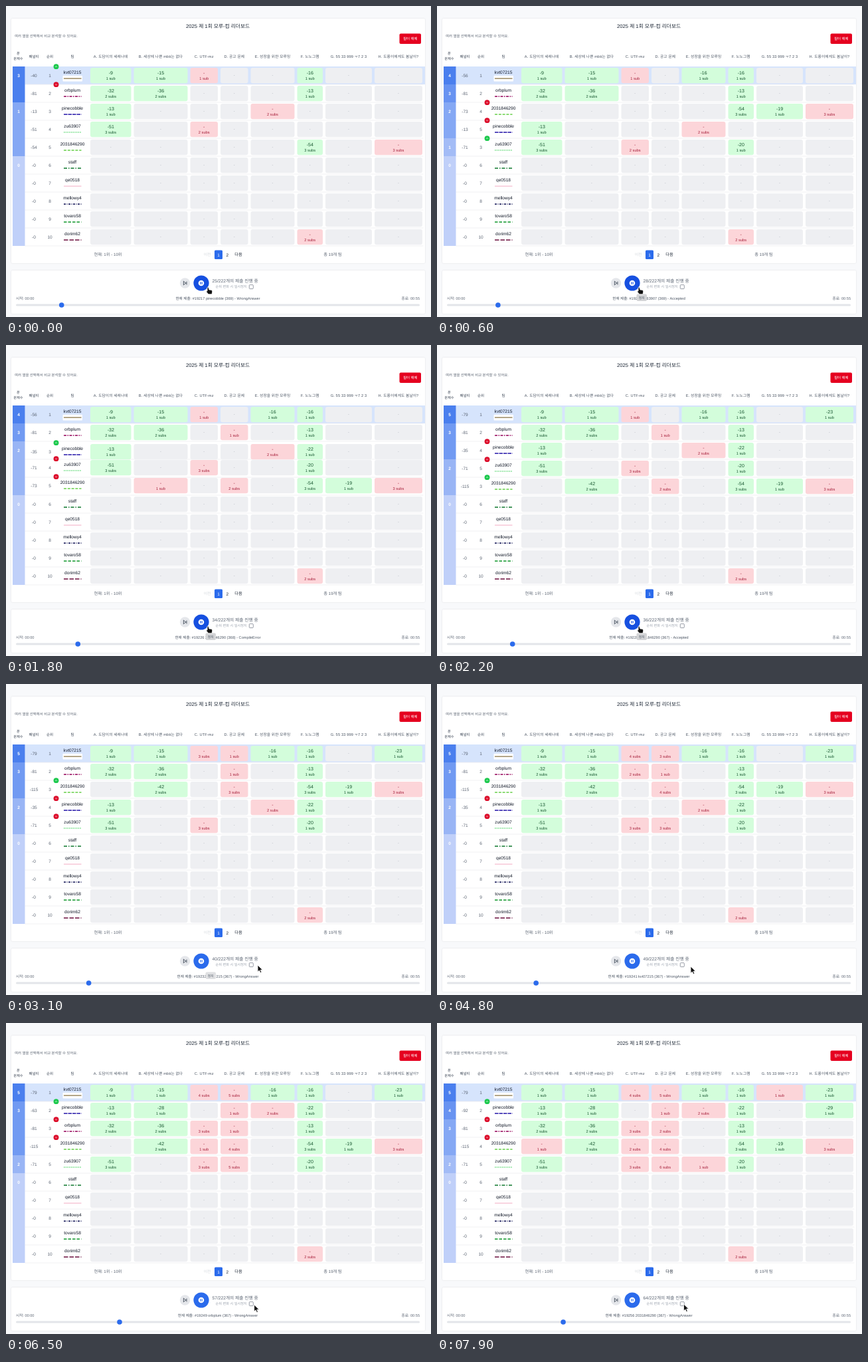
Animation of 640 by 468 pixels, one loop 8000 ms. Source, as an HTML page:

```html
<!DOCTYPE html>
<html lang="ko">
<head>
<meta charset="utf-8">
<title>리더보드</title>
<style>
  html, body { margin: 0; width: 100%; height: 100%; overflow: hidden; background: #f8f9fb; }
  svg { display: block; width: 100vw; height: 100vh; }
  text { font-family: "Liberation Sans", "Noto Sans CJK KR", "Noto Sans CJK", sans-serif; text-rendering: geometricPrecision; }
  .card { fill: #fff; filter: drop-shadow(0 .6px 1.2px rgba(0, 0, 0, .1)); }
</style>
</head>
<body>
<svg viewBox="0 0 640 468">
  <g id="base"></g>
  <g id="groups"></g>
  <g id="rows"></g>
  <g id="badges"></g>
  <g id="player"></g>
  <g id="tooltip"></g>
  <g id="pointer"></g>
</svg>
<script>
const LOOP = 8000, STEP = 200, MOVE = 300, FIRST = 25, TOTAL = 222;
const TOP = 91, ROW = 27;
const GRAY = '#5b6472', BLUE = '#2b6bec';

// name, line colour, dash pattern, line width
const teams = [
  ['kvt07215', '#9b8a62', '', 1.5],
  ['orbplum', '#a3246f', '4 1.5 1.5 1.5', 1.6],
  ['pinecobble', '#4235b4', '5.5 1', 1.6],
  ['zu63907', '#6fdc82', '1.5 1.2', 1.5],
  ['2031846290', '#7dd663', '4 1.8', 1.6],
  ['staff', '#2f8a4a', '5 2 1.5 2', 1.6],
  ['qe0518', '#f5b9cd', '', 1.2],
  ['mellowy4', '#2b2d68', '3 1.5 1 1.5', 1.6],
  ['tovaro58', '#31a548', '4.5 2', 1.6],
  ['dorim62', '#803058', '6.5 2', 1.6]
];

// title, left edge, right edge
const problems = [
  ['A. 도담이의 세레나데', 127, 188.5],
  ['B. 세상에 나쁜 mbti는 없다', 192.5, 273.5],
  ['C. UTF-mz', 277.5, 319],
  ['D. 공고 문제', 323, 364.5],
  ['E. 성장을 위한 모루밍', 368.5, 434.5],
  ['F. 노노그램', 438.5, 477],
  ['G. 55 33 999 ㅜ7 2 3', 481, 551],
  ['H. 도롱이에게도 봄날이?', 555, 627]
];

// team, problem, penalty when solved; "!" is a compile error
const submissions = `
  1A 1A32 1B 1B36 1F13 2A13 3A 3A 3A51 4F 4F 4F54 0A9 0B15 0F16
  0C 3C 3C 4H 4H 4H 9F 9F 2E 2E
  0E16 4G19 3F20 3C 4D 1D 4D 2F22 4B!
  0H23 4B42 0C 4D 0C 0D 3D 1C 0D 3D 4D 1C 0C 3D 0D
  0D 2B28 4C 3D 2D 0D 3D 1C 2H29 4A 3E 0G 3D 1D 4C
`.trim().split(/\s+/).map(code => {
  const [, team, letter, score, error] = code.match(/(\d)([A-H])(\d*)(!?)/);
  const verdict = error ? 'CompileError' : score ? 'Accepted' : 'WrongAnswer';
  return { team: +team, problem: letter.charCodeAt(0) - 65, score: +score, verdict };
});

const states = buildStates();

function buildStates() {
  const board = teams.map(() => problems.map(() => ({ subs: 0, score: 0 })));
  const snapshot = () => {
    const rows = board.map(cells => {
      const solved = cells.filter(c => c.score);
      return {
        cells: cells.map(c => ({ ...c })),
        solved: solved.length,
        penalty: solved.reduce((sum, c) => sum + c.score, 0)
      };
    });
    const order = teams.map((_, i) => i)
      .sort((a, b) => rows[b].solved - rows[a].solved || rows[a].penalty - rows[b].penalty || a - b);
    return { rows, order, rank: teams.map((_, i) => order.indexOf(i)) };
  };
  const list = [snapshot()];
  for (const { team, problem, score } of submissions) {
    const cell = board[team][problem];
    cell.subs++;
    cell.score = score || cell.score;
    list.push(snapshot());
  }
  return list;
}

const el = id => document.getElementById(id);
const rect = (x, y, w, h, fill, r = 0, extra = '') =>
  `<rect x="${x}" y="${y}" width="${w}" height="${h}" rx="${r}" fill="${fill}" ${extra}/>`;
const circle = (x, y, r, fill) => `<circle cx="${x}" cy="${y}" r="${r}" fill="${fill}"/>`;
const path = (d, extra) => `<path d="${d}" ${extra}/>`;
// y is the vertical middle of the line
const text = (x, y, s, size, fill = GRAY, anchor = 'middle', extra = '') =>
  `<text x="${x}" y="${y + size * .36}" font-size="${size}" fill="${fill}" text-anchor="${anchor}" ${extra}>${s}</text>`;

function drawBase() {
  const bold = 'font-weight="500"';
  let s = rect(8, 19, 623, 368, '#fff', 2, 'class="card"') + rect(8, 398, 623, 65, '#fff', 2, 'class="card"');
  s += text(319, 30, '2025 제 1회 모루-컵 리더보드', 7.7, '#1f2937', 'middle', bold);
  s += text(13, 45, '여러 열을 선택해서 비교 분석할 수 있어요.', 5.4, GRAY, 'start');
  s += rect(592.5, 41.5, 32.5, 15.5, '#e5001f', 2) + text(608.8, 49.3, '필터 해제', 5.5, '#fff');
  s += text(18.5, 71.5, '푼', 5.2, '#374151', 'middle', bold) + text(18.5, 79.5, '문제수', 5.2, '#374151', 'middle', bold);
  s += text(42, 76, '패널티', 5.5, '#374151') + text(66, 76, '순위', 5.5, '#374151') + text(100, 76, '팀', 5.5, '#374151');
  for (const [title, left, right] of problems)
    s += text((left + right) / 2, 76, title, 5.7, '#4b5563', 'middle', 'letter-spacing=".12"');
  s += rect(28.5, TOP, 602.5, ROW, '#d6e4fc');
  for (let i = 1; i <= teams.length; i++) s += rect(28.5, TOP + i * ROW - .3, 600, .6, '#e6e8ec');
  s += text(153.5, 374, '현재: 1위 - 10위', 6.2) + text(492, 374, '총 19개 팀', 6.2);
  s += text(303, 374, '이전', 5.8, '#d1d5db') + rect(314, 367.5, 12, 13.5, BLUE, 1.5);
  s += text(320, 374.2, '1', 6.4, '#fff') + text(333.3, 374.2, '2', 6.4, '#1f2937') + text(350, 374, '다음', 6.2, '#1f2937');
  s += text(15, 439.5, '시작: 00:00', 5.6, GRAY, 'start') + text(623, 439.5, '종료: 00:55', 5.6, GRAY, 'end');
  s += circle(269.5, 417, 7.7, '#e5e7eb');
  s += path('M267.4 413.8V420.2M267.4 414.6L271.4 417L267.4 419.4M272 414.5V419.5', 'fill="none" stroke="#4b5563" stroke-width=".9"');
  s += text(315.5, 422.5, '순위 변화 시 일시정지', 5.2, '#9ca3af', 'start');
  s += rect(366.3, 419.6, 6, 6, '#fff', 1, 'stroke="#6b7280" stroke-width=".7"');
  s += rect(15, 448.5, 608, 3, '#e3e5e9', 1.5);
  el('base').innerHTML = s;
}

// Shapes below are drawn around the row's centre line.
function cellMarkup({ subs, score }, left, right) {
  const x = (left + right) / 2;
  const [fill, ink] = score ? ['#d3fddb', '#14532d'] : subs ? ['#fcd5d9', '#a51d38'] : ['#eeeff2', '#a3a9b4'];
  const box = rect(left, -11.6, right - left, 23.4, fill, 3);
  if (!subs) return box + text(x, 0, '-', 5.5, ink);
  return box + text(x, -4, score ? '-' + score : '-', 7, ink)
    + text(x, 4.6, subs + (subs > 1 ? ' subs' : ' sub'), 5.7, ink);
}

function rowMarkup(state, i) {
  const [name, color, dash, width] = teams[i], row = state.rows[i];
  return `<g>${text(42, 0, '-' + row.penalty, 6.5)}${text(66, 0, state.rank[i] + 1, 6.5)}`
    + text(100, -4.7, name, 6.6, '#111827')
    + rect(85.5, .3, 29.5, 8.8, '#fff', 1)
    + path('M87 4.6H113.5', `stroke="${color}" stroke-width="${width}" stroke-dasharray="${dash}"`)
    + row.cells.map((c, p) => cellMarkup(c, problems[p][1], problems[p][2])).join('') + '</g>';
}

function groupsMarkup({ rows, order }) {
  const counts = [...new Set(order.map(i => rows[i].solved))];
  const mix = (a, b, f) => Math.round(a + (b - a) * f);
  return counts.map((count, n) => {
    const f = n / (counts.length - 1);
    const members = order.filter(i => rows[i].solved === count);
    const y = TOP + ROW * order.indexOf(members[0]);
    const fill = `rgb(${mix(74, 192, f)},${mix(127, 208, f)},${mix(238, 249, f)})`;
    return rect(10, y, 18.5, ROW * members.length, fill)
      + text(19, y + 13.5, count, 6.5, '#fff', 'middle', 'font-weight="700"');
  }).join('');
}

function lastShuffle(k) {
  while (k > 1 && states[k].order.join() === states[k - 1].order.join()) k--;
  return k;
}

const easeOut = p => 1 - (1 - Math.min(1, p)) ** 3;

function rowTop(team, k, t) {
  let since = k;
  while (since > FIRST && states[since].rank[team] === states[since - 1].rank[team]) since--;
  const to = states[since].rank[team];
  const from = since > FIRST ? states[since - 1].rank[team] : to;
  const p = easeOut((t - (since - FIRST) * STEP) / MOVE);
  return TOP + ROW * (from + (to - from) * p);
}

function badgesMarkup(k, tops) {
  const at = lastShuffle(k);
  return teams.map((_, i) => {
    const change = states[at].rank[i] - states[at - 1].rank[i];
    if (!change) return '';
    const d = change < 0 ? 1 : -1, y = tops[i] + .2;
    return circle(75.5, y, 3.9, d > 0 ? '#1cc94d' : '#dc0b2a')
      + path(`M74 ${y + .7 * d}L75.5 ${y - .7 * d}L77 ${y + .7 * d}`, 'fill="none" stroke="#fff" stroke-width=".7"');
  }).join('');
}

function playerMarkup(k, hover) {
  const sub = submissions[k - 1], x = 15.5 + k * 2.728;
  const memory = k < 30 ? 369 : k < 35 ? 368 : 367;
  const blue = hover ? '#1650e0' : BLUE;
  return circle(294, 417, 11.6, blue) + circle(294, 417, 4.3, '#fff')
    + rect(292.3, 415.2, 1.1, 3.6, blue) + rect(294.6, 415.2, 1.1, 3.6, blue)
    + text(310.5, 414, `${k}/${TOTAL}개의 제출 진행 중`, 6.7, GRAY, 'start')
    + text(319, 439.5, `현재 제출: #${19192 + k} ${teams[sub.team][0]} (${memory}) - ${sub.verdict}`, 5.6, '#4b5563')
    + circle(x, 450, 3.8, BLUE);
}

// time, x, y of the pointer's tip
const track = [[0, 304, 423], [2750, 304, 423], [3050, 379, 423], [4800, 382, 425], [5400, 375, 424.5], [8000, 371.5, 423]];

function pointerAt(t) {
  const n = track.findIndex(key => key[0] > t);
  const [t0, x0, y0] = track[n - 1], [t1, x1, y1] = track[n];
  const p = (t - t0) / (t1 - t0), f = p * p * (3 - 2 * p);
  return [x0 + (x1 - x0) * f, y0 + (y1 - y0) * f];
}

const arrow = path('M0 0V10.2L2.4 8L4 11.6L5.8 10.8L4.2 7.3H7.4Z', 'fill="#111" stroke="#fff" stroke-width=".8"');
const hand = path('M-.9 .4Q0 -.6 .9 .4L2 4L5 4.3Q7 4.8 6.8 7L6 10.8H.8L-2.4 7Q-2.6 5.6 -1 6Z', 'fill="#111" stroke="#fff" stroke-width=".8"');

let shown = 0;

function render(t) {
  const k = FIRST + Math.floor(t / STEP), state = states[k];
  const hover = t < 2800;
  if (k !== shown) {
    el('groups').innerHTML = groupsMarkup(state);
    el('rows').innerHTML = teams.map((_, i) => rowMarkup(state, i)).join('');
    shown = k;
  }
  const tops = teams.map((_, i) => rowTop(i, k, t));
  tops.forEach((y, i) => el('rows').children[i].setAttribute('transform', `translate(0 ${y + ROW / 2})`));
  el('badges').innerHTML = badgesMarkup(k, tops);
  el('player').innerHTML = playerMarkup(k, hover);

  const tip = t > 500 && t < 3200;
  el('tooltip').innerHTML = tip ? rect(300.5, 433.5, 15.5, 10.5, hover ? '#d3d4d6' : '#dfe0e2', 2) + text(308.2, 438.8, '정지', 4.8, '#4b5563') : '';
  const [x, y] = pointerAt(t);
  el('pointer').innerHTML = `<g transform="translate(${x} ${y})">${hover ? hand : arrow}</g>`;
}

drawBase();
render(0);
let start;
requestAnimationFrame(function tick(now) {
  start ??= now;
  render((now - start) % LOOP);
  requestAnimationFrame(tick);
});
</script>
</body>
</html>
```
